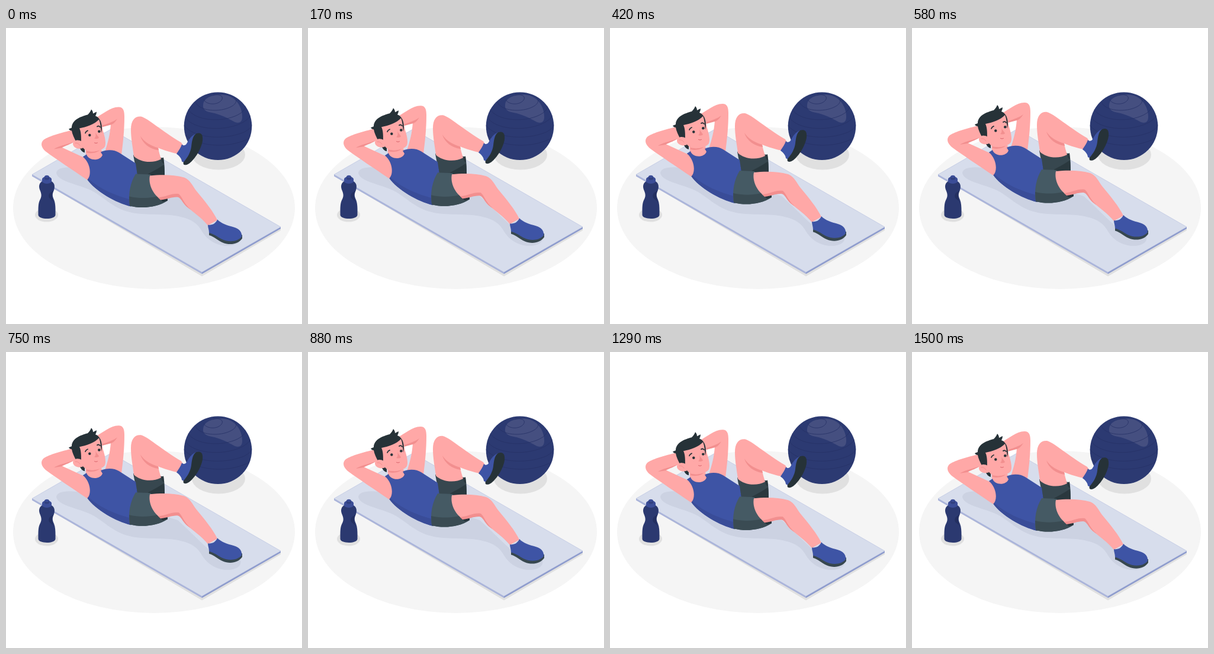
These frames come from a looping animation (500 by 500 pixels, 1.54 s). An HTML page:

```html
<!DOCTYPE html>
<html lang="en">
<head>
<meta charset="utf-8">
<title>Crunches</title>
<style>
  html, body { margin: 0; width: 100%; height: 100%; overflow: hidden; background: #fff; }
  svg { display: block; width: 100%; height: 100%; }
  .skin { fill: #ffa8a7; }
  .fold { fill: #f28f8f; }
  .blue { fill: #3e54a5; }
  .navy { fill: #2b3970; }
  .dark { fill: #263238; }
  .slate { fill: #37474f; }
  .ground { fill: #e0e0e0; }
  .line { fill: none; stroke-linecap: round; }
</style>
</head>
<body>
<svg viewBox="0 0 500 500">
  <ellipse cx="250" cy="304" rx="238" ry="137" fill="#f5f5f5"/>

  <g id="mat">
    <path class="ground" d="M44 250L331 419.500L464 342V337L331 410Z"/>
    <path fill="#aab4da" d="M44 247V250.500L331 415.500V411Z"/>
    <path fill="#8d9bcd" d="M464 336V339L331 415.500V411Z"/>
    <path fill="#d7ddec" stroke="#aab4da" stroke-width=".5" d="M44 247.500L177 171L464 336L331 412.500Z"/>
    <path fill="#ccd2e2" d="M85 245C86 235 103 232 138 239L220 262L290 284C306 298 325 318 342 333L396 352C399 364 384 369 370 368C352 366 340 357 332 345C325 332 315 323 295 319C270 312 230 318 205 310C178 302 166 286 145 275C124 264 88 260 85 245Z"/>
  </g>

  <g id="ball">
    <ellipse class="ground" cx="359" cy="214" rx="45" ry="25.500"/>
    <circle cx="358" cy="165.800" r="57.300" fill="#2c3a72"/>
    <path fill="#454f80" d="M333 130C334 116 352 112 368 113C390 115 400 136 399 152C398 161 391 162 383 157C369 149 355 144 343 142C336 140 332 136 333 130Z"/>
    <g class="line" stroke="#263266" stroke-width=".8">
      <path d="M334 121C338 130 357 131 364 122C369 115 360 111 350 113"/>
      <path d="M320 125C326 141 361 143 380 133C390 128 391 121 385 116"/>
      <path d="M308 138C320 157 365 160 391 147C401 142 405 136 404 132"/>
      <path d="M303 151C315 171 365 176 397 161C407 156 412 151 412 148"/>
      <path d="M301 165C316 185 365 191 402 176C410 172 414 168 415 164"/>
      <path d="M303 181C324 199 368 204 403 190C408 188 411 186 412 184"/>
    </g>
  </g>

  <g id="bottle">
    <ellipse class="ground" cx="68.500" cy="316" rx="19.500" ry="11.500"/>
    <path class="navy" d="M61 259C56 262 55 267 57 273C60 280 61 284 57 291C54 297 54.500 307 54.500 316C56 324 82 324 83.500 316C83.500 307 84 297 81 290C78 284 78 280 81 274C83 267 82 262 77 259Z"/>
    <path fill="#232f60" d="M80 275C73 278 71 282 73 287L80 293C77 286 77 281 80 275Z"/>
    <path fill="#3b4d97" d="M61 255C62 252 65 252 65 251C66 248 72 248 73 251C73 252 76 252 77 255V260C73 264 65 264 61 260Z"/>
    <path fill="#31407f" d="M65 251C67 254 71 254 73 251V255C71 257 67 257 65 255Z"/>
  </g>

  <g id="athlete">
    <g id="farArm">
      <path class="skin" d="M150 153C164 146 176 134 190 134C198 134 200 140 200 150C200 172 198 192 195 215L167 210C172 194 176 180 177 162L161 167Z"/>
      <path class="fold" d="M163 165C172 162 181 159 188 154C184 160 181 163 177 164L162 168Z"/>
    </g>

    <g id="farLeg">
      <path class="slate" d="M215 215L266 220C268 231 268 241 268 251L222 256C221 240 217 228 215 215Z"/>
      <path fill="#2a383e" d="M267 231C260 236 250 242 240 247L243 251H268Z"/>
      <path fill="#2a383e" d="M262 222L266 219L267 230C264 229 263 226 262 222Z"/>
      <path class="skin" d="M211 172C211 156 218 149 228 150C240 153 262 174 296 194L300 200L290 213C280 211 267 207 257 203C258 209 260 215 262 222C247 230 226 227 216 217C214 201 211 187 211 172Z"/>
      <path class="fold" d="M227 183C233 193 246 200 257 203L258 207C243 205 231 196 227 183Z"/>
      <path class="blue" d="M297 197C300 200 303 199 305 196C309 189 313 182 321 179L322 205L303 229L297 226C297 221 292 216 288 213C292 207 295 203 297 197Z"/>
      <path class="dark" d="M321 179C330 176 333 181 332 191C330 205 319 222 310 229C303 234 298 232 300 227C307 219 312 210 313 201C314 193 315 183 321 179Z"/>
    </g>

    <g id="torso">
      <path class="skin" d="M134 202L161 206L164 213C164 227 138 228 135 215Z"/>
      <path class="fold" d="M136 207C145 211 152 209 159 206C154 212 143 213 136 211Z"/>
      <path class="blue" d="M130 218L136 214C139 225 159 226 163 215L160 210C171 205 183 206 191 211L219 229L222 250C214 266 210 283 212 302C186 296 151 276 137 256Z"/>
      <path fill="#394c98" d="M139 255C162 275 185 283 209 290L211 302C185 296 151 276 137 256Z"/>
    </g>

    <g id="nearLeg">
      <path fill="#455a64" d="M219 247L244 248L272 283L273 292C255 304 229 306 209 301C206 280 210 262 219 247Z"/>
      <path fill="#3a4b53" d="M208 285C230 290 251 287 262 283L273 289V292C255 304 229 306 209 301Z"/>
      <path class="dark" d="M261 290C264 287 269 286 272 287L273 292L265 294Z"/>
      <path class="skin" d="M243 250C262 248 283 248 301 253C311 257 315 267 321 275C336 293 350 310 357 325L341 334C330 321 316 311 306 303C297 296 297 287 291 284C280 284 272 289 261 290C249 282 240 265 243 250Z"/>
      <path class="fold" d="M257 287C270 286 281 279 292 281C298 286 300 297 312 307C298 299 297 287 289 286C279 286 272 290 261 291Z"/>
      <path class="slate" d="M343 344L399 350V356C392 366 378 368 366 363C357 359 352 353 343 350.500Z"/>
      <path class="blue" d="M341 333C348 334 354 331 357 324C364 331 374 334 385 337C395 340 399 346 398 353C390 363 374 362 364 357C357 353 350 348 343 346.500C343 341 341 338 341 333Z"/>
    </g>

    <g id="nearArm">
      <path class="skin" d="M112 173C95 177 73 183 64 189C57 195 60 203 67 209C86 223 112 240 137 257C145 250 143 230 131 219L94 202C101 199 110 195 119 191Z"/>
      <path class="fold" d="M81 205C88 200 100 198 114 193L116 192C109 197 101 199 94 203Z"/>
    </g>

    <g id="head">
      <path class="dark" d="M124 200L133 201V211C128 210 126 206 124 202Z"/>
      <path class="skin" d="M122 165L158 151C162 160 162 169 165 178C168 188 169 196 167 201C163 208 145 211 136 208C130 204 126 198 123 190Z"/>
      <path class="dark" d="M106 171L111 169C111 156 126 150 138 147C141 144 143 141 144 138C146 140 147 142 147 145L153 142C153 145 152 147 151 149C160 152 164 165 161 178C160 171 160 162 157 155C150 163 135 168 124 170C127 176 127 184 127 193L118 192C115 186 112 180 111 174C109 174 107 173 106 171Z"/>
      <path class="skin" d="M128 192C122 188 113 190 113 196C113 202 122 207 130 203Z"/>
      <path class="line" stroke="#f28f8f" d="M117 195Q122 194 125 199"/>
      <path class="fold" d="M151 177C153 181 156 183 157 186C155 188 152 188 149 187C152 185 152 181 151 177Z"/>
      <circle class="dark" cx="141.300" cy="181.500" r="2.200"/>
      <circle class="dark" cx="157.300" cy="175.300" r="2.200"/>
      <path class="line" stroke="#263238" stroke-width="1.800" d="M134 178Q135 175 138 174M154 167Q157 165 159 168"/>
      <path class="line" stroke="#d9646c" d="M149.500 194.500Q152 196 154.500 194.500"/>
    </g>
  </g>
</svg>
<script>
  const LOOP = 1540, PEAK = 730, TRAVEL = 10;
  const athlete = document.getElementById("athlete");
  const start = performance.now();

  // Linear rise and fall, highest at PEAK.
  function lift(t) {
    return TRAVEL * (1 - Math.abs(t - PEAK) / (LOOP / 2));
  }

  function draw() {
    const t = (performance.now() - start) % LOOP;
    athlete.setAttribute("transform", `translate(0 ${-lift(t).toFixed(2)})`);
    requestAnimationFrame(draw);
  }
  draw();
</script>
</body>
</html>
```
